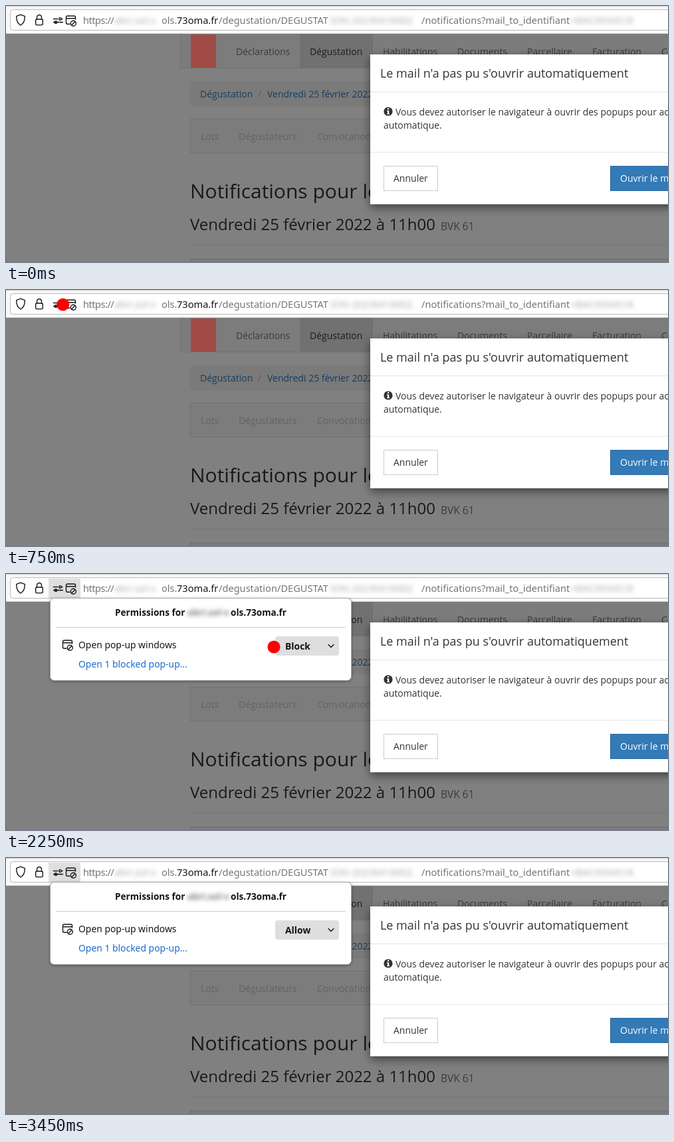
An HTML page that plays this animation: 996 by 386 pixels, repeating every 3750 ms.

```html
<!DOCTYPE html>
<html lang="fr">
<head>
<meta charset="utf-8">
<title>Autoriser les popups</title>
<style>
  html, body { margin: 0; width: 100%; height: 100%; overflow: hidden; background: #808080; }
  svg { display: block; width: 996px; height: 386px; }
  text { white-space: pre; }
  .page text, .modal text { font: 14px "Open Sans", sans-serif; }
  .chrome text, .panel text { font: 14.6px "Noto Sans", sans-serif; }
  .panel text { font-size: 13.9px; fill: #15141a; }
  .panel .bold { font-weight: 700; }
  .panel .head { font-size: 13.6px; }
  .panel .link { fill: #1b6acb; }
  .page .h2 { font-size: 30px; }
  .page .h3 { font-size: 24px; }
  .page .small { font-size: 15.6px; }
  .modal .title { font-size: 18px; }
  .modal { filter: drop-shadow(0 5px 7px rgba(0, 0, 0, .5)); }
  .frame { filter: drop-shadow(0 1px 2px rgba(0, 0, 0, .35)); }
  .blur { filter: blur(3px); }
  .chrome .tight { letter-spacing: -.5px; }
  .line { fill: none; stroke: #15141a; stroke-width: 1.4; stroke-linecap: round; stroke-linejoin: round; }
  .dot { fill: #f00; }

  .step { visibility: hidden; animation: 3750ms step-end infinite; }
  .click1 { animation-name: click1; }
  .open { animation-name: open; }
  .click2 { animation-name: click2; }
  .block { animation-name: block; }
  .allow { animation-name: allow; }
  @keyframes click1 { 0% { visibility: hidden } 20% { visibility: visible } 40%, 100% { visibility: hidden } }
  @keyframes open { 0% { visibility: hidden } 40%, 100% { visibility: visible } }
  @keyframes click2 { 0% { visibility: hidden } 60% { visibility: visible } 80%, 100% { visibility: hidden } }
  @keyframes block { 0% { visibility: hidden } 40% { visibility: visible } 80%, 100% { visibility: hidden } }
  @keyframes allow { 0% { visibility: hidden } 80%, 100% { visibility: visible } }
</style>
</head>
<body>
<svg viewBox="0 0 996 386">
  <defs>
    <g id="blocked" class="line">
      <path d="M96 27.3H92.5a2 2 0 0 1-2-2V17a2 2 0 0 1 2-2h10a2 2 0 0 1 2 2v3M90.5 18.7h14"/>
      <circle cx="101.3" cy="26.2" r="4"/>
      <path d="M98.6 28.9l5.4-5.4"/>
    </g>
  </defs>

  <g class="page">
    <rect width="996" height="386" fill="#808080"/>
    <rect x="262.5" y="40.5" width="760" height="53" fill="#7c7c7c" stroke="#717171"/>
    <rect x="442" y="42" width="110" height="51" fill="#717171"/>
    <rect x="278" y="43" width="38" height="50" fill="#a14b45"/>
    <g fill="#3b3b3b">
      <text x="346" y="74">Déclarations</text>
      <text x="457" y="74" fill="#1c1c1c">Dégustation</text>
      <text x="567" y="74">Habilitations</text>
      <text x="679" y="74">Documents</text>
      <text x="784" y="74">Parcellaire</text>
      <text x="882" y="74">Facturation</text>
      <text x="986" y="74">Contacts</text>
    </g>

    <rect x="277" y="114" width="760" height="37" rx="4" fill="#7a7a7a"/>
    <g fill="#193d5c">
      <text x="292" y="138">Dégustation</text>
      <text x="379" y="138" fill="#5c5c5c">/</text>
      <text x="393" y="138">Vendredi 25 février 2022</text>
    </g>

    <rect x="277.5" y="170.5" width="760" height="51" fill="#7c7c7c" stroke="#717171"/>
    <g fill="#636363">
      <text x="293" y="202">Lots</text>
      <text x="350" y="202">Dégustateurs</text>
      <text x="468" y="202">Convocations</text>
    </g>

    <g fill="#191919">
      <text class="h2" x="277" y="290">Notifications pour les</text>
      <text class="h3" x="277" y="338">Vendredi 25 février 2022 à 11h00</text>
      <text class="small" x="654" y="338" fill="#3b3b3b">BVK 61</text>
    </g>
    <path d="M277 360.5H996" stroke="#757575"/>
    <rect x="277.5" y="381.5" width="760" height="20" fill="#7a7a7a" stroke="#6c6c6c"/>
  </g>

  <g class="modal">
    <rect x="548" y="73" width="600" height="226" fill="#fff"/>
    <path d="M548 129.5H996M548 220.5H996" stroke="#e5e5e5"/>
    <g fill="#333">
      <text class="title" x="563" y="108">Le mail n'a pas pu s'ouvrir automatiquement</text>
      <circle cx="575" cy="159" r="6.6"/>
      <path d="M574 154h2.2v2H574zM573 157.5h3.2v4.5h1v1.3h-4.2V162h1v-3.2h-1z" fill="#fff"/>
      <text x="586" y="165">Vous devez autoriser le navigateur à ouvrir des popups pour accéder</text>
      <text x="568" y="185">automatique.</text>
      <rect x="568.5" y="241.5" width="81" height="37" fill="#fff" stroke="#ccc"/>
      <text x="583" y="265">Annuler</text>
    </g>
    <rect x="909.5" y="241.5" width="130" height="37" fill="#337ab7" stroke="#2e6da4"/>
    <text x="924" y="265" fill="#fff">Ouvrir le mail</text>
  </g>

  <g class="chrome">
    <rect width="996" height="42" fill="#f8f8f8"/>
    <path d="M0 .5H996M0 41.5H996" stroke="#d2d0ce"/>
    <rect x="6.5" y="5.5" width="1010" height="31" rx="4" fill="#fff" stroke="#bdbbb9"/>
    <rect class="step open" x="64" y="7" width="48" height="29" fill="#dededf"/>

    <g class="line">
      <path d="M22 13.2l6.3 2.2c.2 6.300-1.500 10.800-6.300 13.600c-4.800-2.800-6.500-7.300-6.300-13.600z"/>
      <rect x="44.700" y="20" width="10.600" height="8.600" rx="1.500"/>
      <path d="M46.500 20v-3a3.500 3.500 0 0 1 7 0v3"/>
      <path d="M71.500 19.500h6M82.500 24.500h3M71.500 24.500h4"/>
      <circle cx="81.500" cy="19.500" r="1.800"/>
      <circle cx="75" cy="24.500" r="1.800"/>
      <path d="M83.500 19.500h1.500M77 24.500h6"/>
    </g>
    <use href="#blocked"/>

    <g fill="#75747b">
      <text class="tight" x="116" y="27">https://</text>
      <text class="blur" x="163" y="27" opacity=".6">abri.sol-v</text>
      <text x="234" y="27">ols.</text>
      <text x="257" y="27" fill="#15141a">73oma.fr</text>
      <text x="320" y="27">/degustation/DEGUSTAT</text>
      <text class="blur" x="488" y="27" opacity=".6">ION-20230418002</text>
      <text x="625" y="27">/notifications?mail_to_identifiant</text>
      <text class="blur" x="849" y="27" opacity=".6">=BAC0934518</text>
    </g>
  </g>

  <g class="panel step open">
    <rect class="frame" x="66.500" y="36.500" width="453" height="124" rx="6" fill="#fff" stroke="#a9a7a5"/>
    <text class="bold head" x="164" y="63">Permissions for</text>
    <text class="bold head blur" x="273" y="63" opacity=".55">abri.sol-v</text>
    <text class="bold head" x="338" y="63">ols.73oma.fr</text>
    <path d="M75 80.500H511" stroke="#d0cbc8"/>
    <use href="#blocked" x="-5" y="85"/>
    <text x="109" y="112">Open pop-up windows</text>
    <text class="link" x="109" y="141">Open 1 blocked pop-up…</text>
    <rect x="405" y="94" width="96" height="29" rx="4" fill="#dededf"/>
    <path class="line" d="M485 106.500l4 4l4-4"/>
  </g>
  <g class="panel">
    <text class="bold step block" x="420" y="114">Block</text>
    <text class="bold step allow" x="420" y="114">Allow</text>
  </g>

  <circle class="dot step click1" cx="85.700" cy="22" r="9.600"/>
  <circle class="dot step click2" cx="403" cy="110" r="9.600"/>
</svg>
</body>
</html>
```
